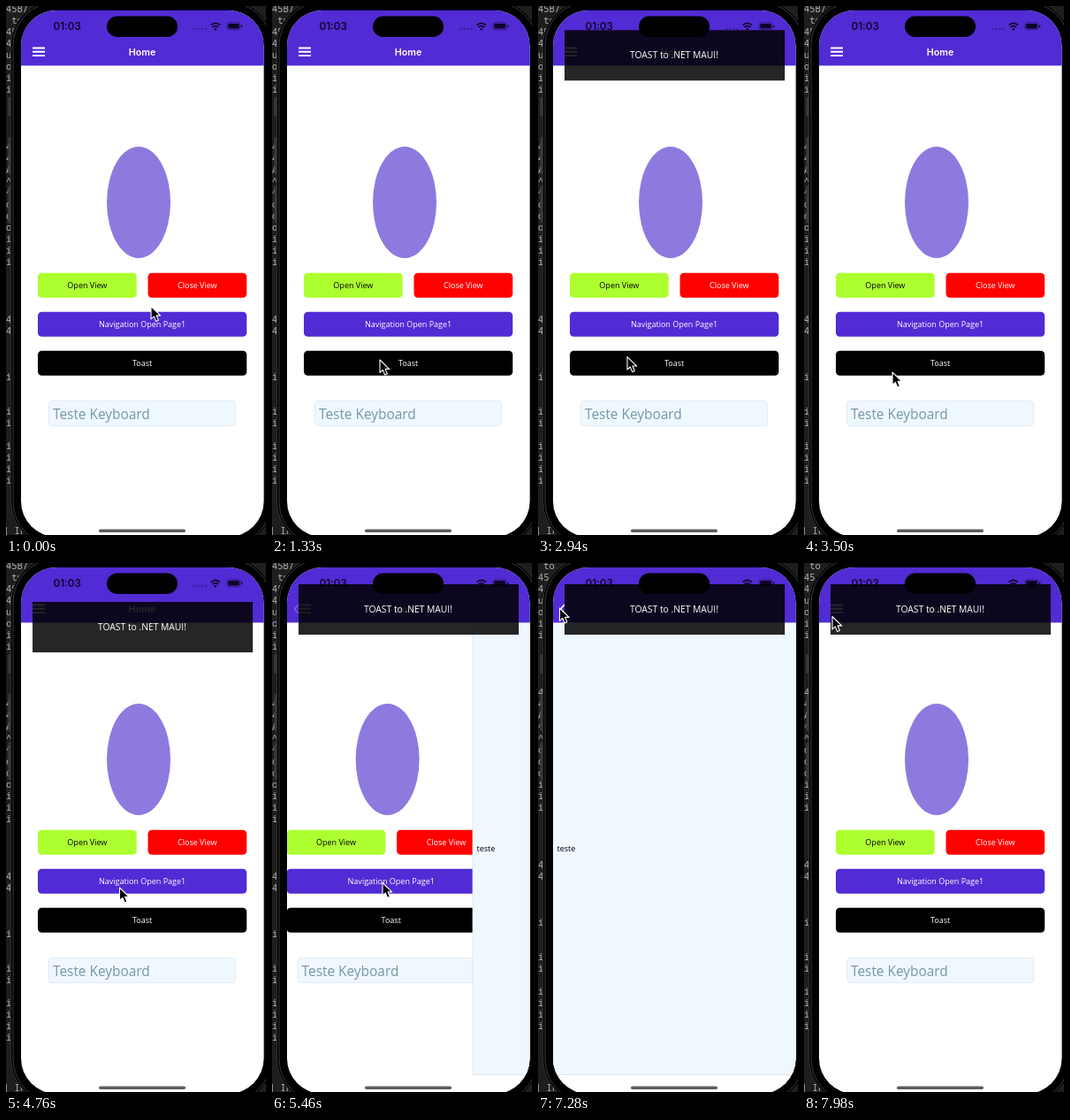
An HTML page that plays this animation: 294x598 px, repeating every 8000 ms.

```html
<!DOCTYPE html>
<html lang="en">
<head>
<meta charset="utf-8">
<title>Toast demo</title>
<style>
  html, body { margin: 0; width: 100%; height: 100%; overflow: hidden; background: #1e1e1e; }
  svg { display: block; width: 100vw; height: 100vh; }
  text { font-family: "Open Sans", "Noto Sans", sans-serif; }
  .mono text { font: 10.5px "Noto Sans Mono", "DejaVu Sans Mono", monospace; fill: #b4b4b4; white-space: pre; }
  .mid { text-anchor: middle; }
  .system { font-family: Inter, sans-serif; }
</style>
</head>
<body>
<svg viewBox="0 0 294 598" preserveAspectRatio="none">
  <defs>
    <clipPath id="screen"><rect x="17" y="5" width="274.5" height="595" rx="40"/></clipPath>
  </defs>

  <rect width="294" height="598" fill="#1e1e1e"/>
  <g class="mono">
    <g id="log"></g>
    <rect y="587" width="26" height="11" fill="#1e1e1e"/>
    <text x="-3" y="597">] In</text>
  </g>

  <g fill="#3a3a3c">
    <rect x="2.5" y="103" width="4" height="22" rx="1.5"/>
    <rect x="2.5" y="148" width="4" height="42" rx="1.5"/>
    <rect x="2.5" y="203" width="4" height="42" rx="1.5"/>
  </g>
  <rect x="5.5" y="-7" width="297" height="619" rx="52" fill="#000" stroke="#303032"/>
  <rect x="8" y="-4.5" width="292" height="614" rx="49" fill="none" stroke="#48484a" stroke-width=".8"/>

  <g clip-path="url(#screen)">
    <rect x="17" y="5" width="275" height="595" fill="#fff"/>

    <g id="home">
      <ellipse cx="150" cy="222" rx="36" ry="63" fill="#8e79df"/>
      <g id="buttons"></g>
      <rect x="48.5" y="446.5" width="211" height="28" rx="3.5" fill="#f0f8ff" stroke="#e0ebf3"/>
      <text x="53" y="466.5" font-size="15.4" fill="#7497a4">Teste Keyboard</text>
    </g>

    <g id="page">
      <rect x="17" y="67" width="275" height="533" fill="#fff"/>
      <rect x="17" y="67" width="275" height="512" fill="#f0f8ff"/>
      <path d="M17 67V579M17 578.5H292" stroke="#d9e2ea" stroke-width=".8"/>
      <text x="21.5" y="326" font-size="9">teste</text>
    </g>

    <rect x="17" y="5" width="275" height="62.4" fill="#512bd4"/>
    <g id="homeBar">
      <path d="M30 47.5H44M30 51.8H44M30 56.1H44" stroke="#fff" stroke-width="1.9"/>
      <text class="mid system" x="154" y="56.4" font-size="10.7" font-weight="600" fill="#fff">Home</text>
    </g>
    <path id="back" d="M30 47L25.5 52L30 57" fill="none" stroke="#fff" stroke-width="1.6"/>

    <g fill="#0d0628">
      <text class="system" x="53.5" y="27" font-size="11.6" font-weight="600">01:03</text>
      <g opacity=".45">
        <circle cx="213.5" cy="26" r="1"/><circle cx="217.5" cy="26" r="1"/>
        <circle cx="221.5" cy="26" r="1"/><circle cx="225.5" cy="26" r="1"/>
      </g>
      <g fill="none" stroke="#0d0628" stroke-width="1.7">
        <path d="M231.6 21.6Q236.8 17 242 21.6M233.5 24Q236.8 21.2 240.1 24"/>
        <rect x="250" y="18.8" width="15" height="8" rx="2.4" stroke-width=".8" opacity=".6"/>
      </g>
      <circle cx="236.8" cy="26.2" r="1.3"/>
      <rect x="251.2" y="20" width="12.6" height="5.6" rx="1.3"/>
      <rect x="266" y="21.4" width="1.3" height="2.8" rx=".6"/>
    </g>

    <g id="toast">
      <rect x="30" width="249" height="57" fill="#000" fill-opacity=".85"/>
      <text class="mid" x="154" y="32.2" font-size="10.3" fill="#fff">TOAST to .NET MAUI!</text>
    </g>
    <rect x="114" y="11.5" width="80" height="23.5" rx="11.75" fill="#000"/>
    <rect x="105" y="591.5" width="98" height="3.4" rx="1.7" fill="#5c5c5e"/>
  </g>

  <path id="cursor" d="M0 0V14.4L3.3 11.4L5.7 17L8.4 15.8L6 10.4H10.6Z" fill="#000" stroke="#fff" stroke-width="1.1" stroke-linejoin="round"/>
</svg>

<script>
const LOOP = 8000;
const $ = id => document.getElementById(id);

// Terminal lines, 13px apart; only their first characters show beside the phone.
const logLines = ["45B/", " to", "45", "4", "u", "o", "i", "i", "", "", "", "", "4", "4", "A",
  "^", "^", "o", "o", "o", "i", "i", "i", "", "", "", "", "4", "4", "", "", "", "i", "", "",
  "i", "i", "", "i", "i", "i", "i"];
$("log").innerHTML = logLines.map((s, i) => `<text y="${7 + 13 * i}">${s}</text>`).join("");

const button = (x, y, w, fill, color, label) =>
  `<rect x="${x}" y="${y}" width="${w}" height="28" rx="4.5" fill="${fill}"/>
   <text class="mid" x="${x + w / 2}" y="${y + 17.3}" font-size="9" fill="${color}">${label}</text>`;
$("buttons").innerHTML =
  button(36, 301.7, 111.7, "#adff2f", "#000", "Open View") +
  button(160.5, 301.7, 111.7, "#f00", "#fff", "Close View") +
  button(36, 345.7, 236.2, "#512bd4", "#fff", "Navigation Open Page1") +
  button(36, 389.7, 236.2, "#000", "#fff", "Toast");

const progress = (t, start, length) => Math.min(1, Math.max(0, (t - start) / length));
const easeOut = p => 1 - (1 - p) ** 3;
const smooth = p => p * p * (3 - 2 * p);
const springIn = p => p * p * (2.70158 * p - 1.70158);
const springOut = p => 1 - springIn(1 - p);

// time, x, y
const cursorPath = [
  [0, 164, 339.5], [980, 122, 400], [1400, 122, 400], [2030, 104, 380], [2660, 101, 396],
  [2870, 101, 396], [3500, 100, 414], [3640, 104, 416], [3990, 125, 400], [4300, 125, 400],
  [4760, 128.5, 367], [5320, 125, 361.5], [5540, 125, 361.5], [6230, 72, 145],
  [7000, 24.5, 51], [7280, 24.5, 51], [7980, 32, 60.5], [LOOP, 32, 60.5]
];

function cursorAt(t) {
  const i = cursorPath.findIndex((point, k) => k && t <= point[0]);
  const [t0, x0, y0] = cursorPath[i - 1], [t1, x1, y1] = cursorPath[i];
  const p = smooth((t - t0) / (t1 - t0));
  return [x0 + (x1 - x0) * p, y0 + (y1 - y0) * p];
}

function toastY(t) {
  const shown = t < 4000
    ? springOut(progress(t, 1470, 750)) - springIn(progress(t, 2860, 750))
    : springOut(progress(t, 4325, 750));
  return -176 + 200 * shown;
}

const move = (id, x, y) => $(id).setAttribute("transform", `translate(${x.toFixed(2)} ${y.toFixed(2)})`);
const fade = (id, value) => $(id).setAttribute("opacity", value.toFixed(3));

function draw(t) {
  const pushed = easeOut(progress(t, 5418, 500)) - easeOut(progress(t, 7300, 500));
  move("page", 275 * (1 - pushed), 0);
  move("home", -82 * pushed, 0);
  fade("homeBar", 1 - pushed);
  fade("back", pushed);
  move("toast", 0, toastY(t));
  move("log", 0, t < 5700 ? 0 : -13);
  move("cursor", ...cursorAt(t));
}

const begin = performance.now();
function tick() {
  draw((performance.now() - begin) % LOOP);
  requestAnimationFrame(tick);
}
tick();
</script>
</body>
</html>
```
